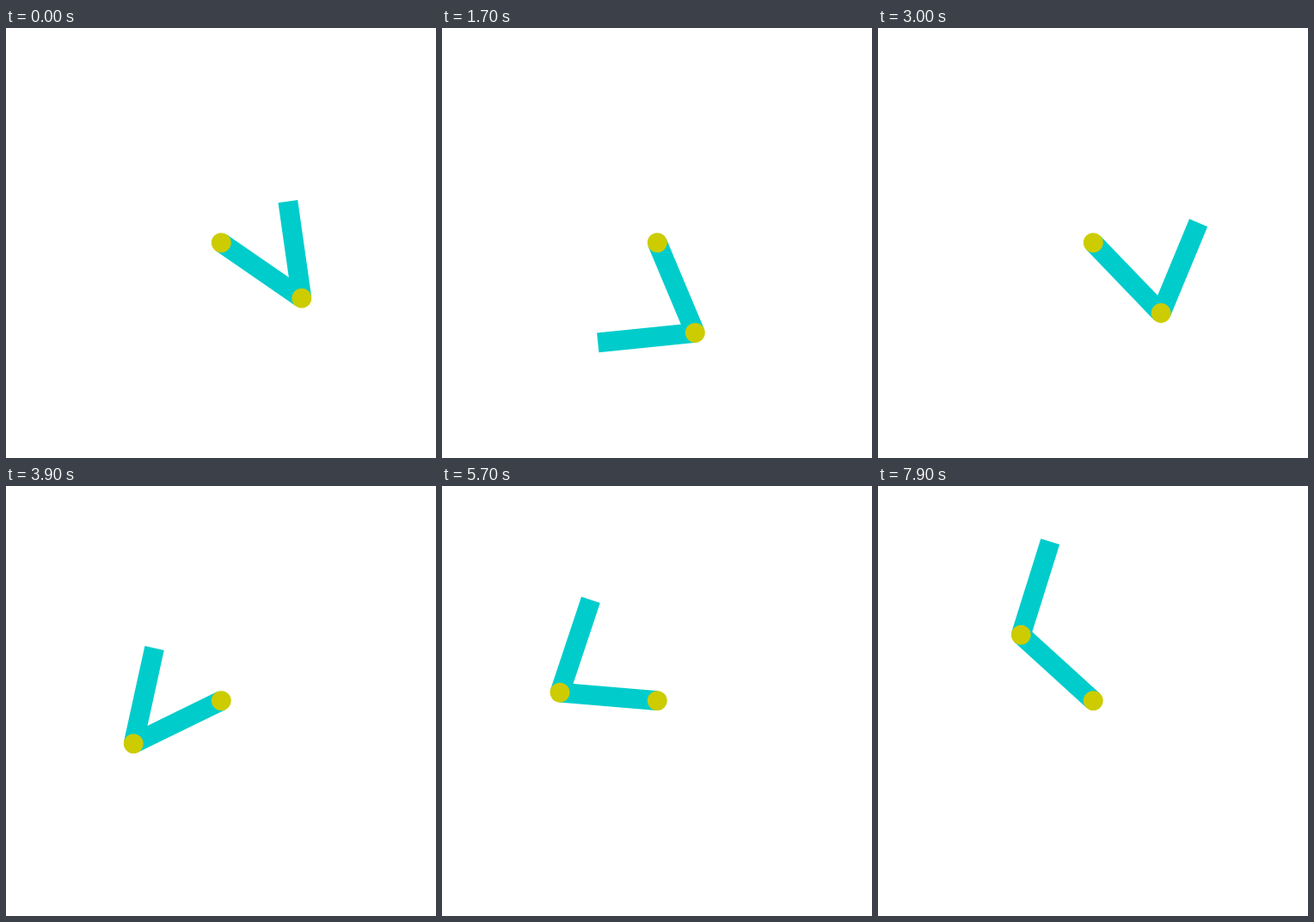
An HTML page with a canvas that plays this animation: 500 by 500 pixels, repeating every 8 s.

```html
<!DOCTYPE html>
<html lang="en">
<head>
<meta charset="utf-8">
<title>Two-link swing-up</title>
<style>
  html, body { margin: 0; width: 100%; height: 100%; overflow: hidden; background: #fff; }
  canvas { display: block; width: 500px; height: 500px; }
</style>
</head>
<body>
<canvas id="stage" width="500" height="500"></canvas>
<script>
const STEPS = 80, STEP_MS = 100;
const LENGTH = 500 / 4.4, RADIUS = 11.45;
const PIVOT = [250.3, 249.6];

// Key points [step, degrees from straight down], mostly where a link turns back.
const upper = [
  [0, 55.4], [5.5, -20], [14, 37], [17, 22.8], [23.4, -53], [30, 43.9], [32, 52],
  [39.6, -66], [48, 75.8], [49.2, 79], [57, -94.8], [57.9, -97],
  [68, 122.9], [69.2, 126], [79, -132.3]
];
const lower = [
  [0, 188.1], [4, 165], [9, 0], [15.3, -92], [17, -84.2], [24, 5], [30, 157.5],
  [34, 187], [39.6, 167], [48, 191.4], [57, 161.6], [68, 205], [79, 162.6]
];

// Slope at a key: zero at turning points and ends, else the harmonic mean.
function slope(keys, k) {
  if (k === 0 || k === keys.length - 1) return 0;
  const rate = i => (keys[i + 1][1] - keys[i][1]) / (keys[i + 1][0] - keys[i][0]);
  const a = rate(k - 1), b = rate(k);
  return a * b > 0 ? 2 * a * b / (a + b) : 0;
}

function angleAt(keys, step) {
  const k = Math.max(1, keys.findIndex(key => key[0] >= step)) - 1;
  const [t0, a0] = keys[k], [t1, a1] = keys[k + 1];
  const span = t1 - t0, u = (step - t0) / span, v = 1 - u;
  const ease = u * u * (3 - 2 * u);
  const bend = span * u * v * (slope(keys, k) * v - slope(keys, k + 1) * u);
  return (a0 + (a1 - a0) * ease + bend) * Math.PI / 180;
}

const ctx = document.getElementById("stage").getContext("2d");

// Draws a link with its joint and returns the far end.
function link([x, y], angle) {
  ctx.save();
  ctx.translate(x, y);
  ctx.rotate(Math.PI / 2 - angle);
  ctx.fillStyle = "rgb(0,204,204)";
  ctx.fillRect(0, -RADIUS, LENGTH, 2 * RADIUS);
  ctx.restore();
  ctx.fillStyle = "rgb(204,204,0)";
  ctx.beginPath();
  ctx.arc(x, y, RADIUS, 0, 2 * Math.PI);
  ctx.fill();
  return [x + LENGTH * Math.sin(angle), y + LENGTH * Math.cos(angle)];
}

function draw(step) {
  ctx.fillStyle = "#fff";
  ctx.fillRect(0, 0, 500, 500);
  const elbow = link(PIVOT, angleAt(upper, step));
  link(elbow, angleAt(lower, step));
}

let start = null;
function tick(now) {
  if (start === null) start = now;
  draw(Math.floor((now - start) / STEP_MS) % STEPS);
  requestAnimationFrame(tick);
}
draw(0);
requestAnimationFrame(tick);
</script>
</body>
</html>
```
